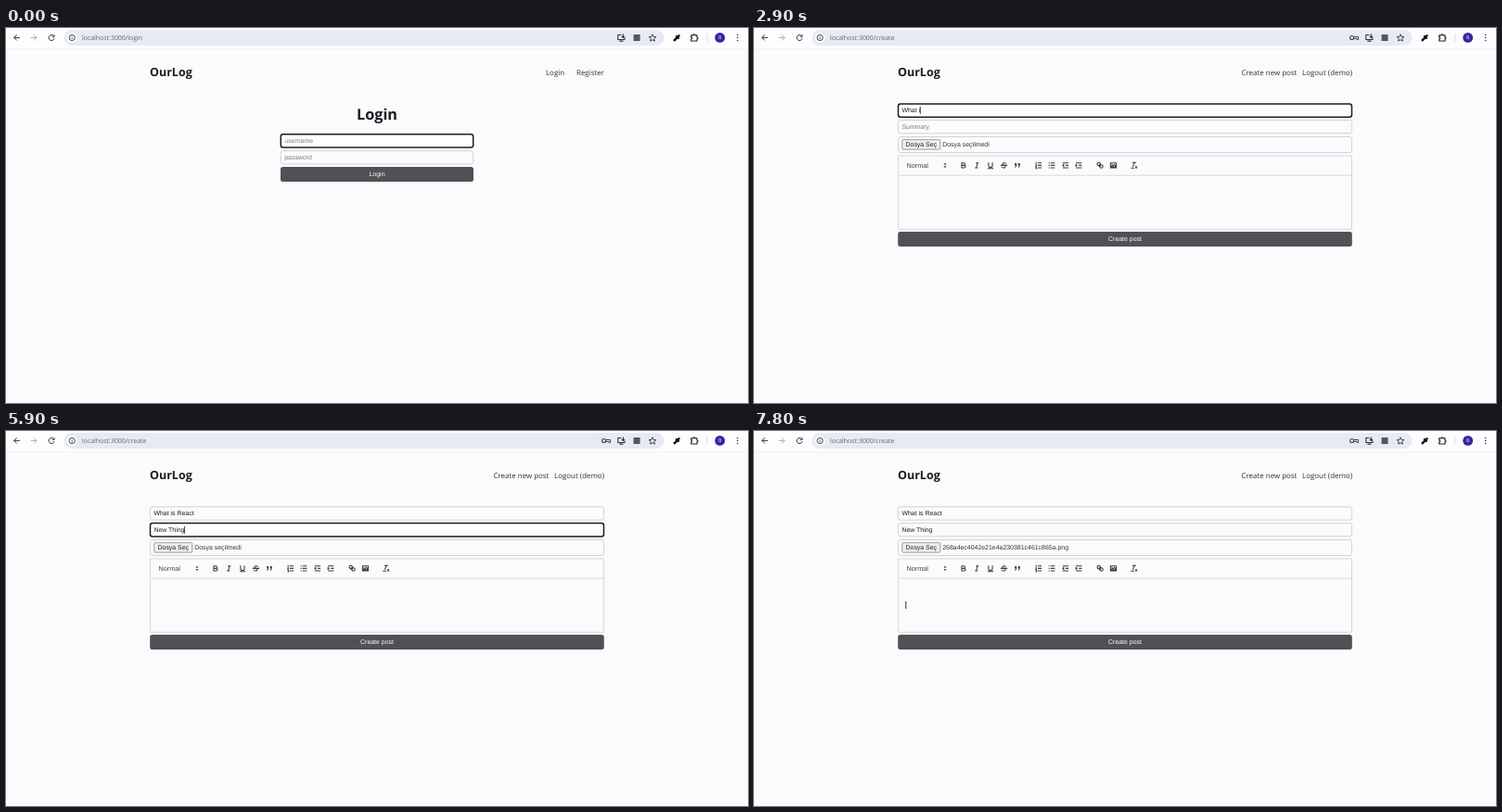
Animation of 800 by 405 pixels, one loop 8 s. Source, as an HTML page with a canvas:

```html
<!DOCTYPE html>
<html lang="en">
<head>
<meta charset="utf-8">
<title>Blog demo</title>
<style>
html, body { margin: 0; width: 100%; height: 100%; overflow: hidden; background: #fbfafd; }
canvas { display: block; }
</style>
</head>
<body>
<canvas id="stage" width="800" height="405"></canvas>
<script>
const ctx = document.getElementById('stage').getContext('2d');
const LOOP = 8000;
const UI = '"Open Sans", "Noto Sans", sans-serif';
const FORM = '"Liberation Sans", Arial, sans-serif';
const INK = '#1d1b20', BORDER = '#cfced2', PAGE = '#fbfafd';
const SITE = 'OurLog', USER = 'demo';
const FILE = '268a4ec4042e21e4a230381c461c865a';

// Drawing helpers; text is placed by the middle of its capitals.
function text(s, x, y, size, color = INK, { font = UI, weight = 400, align = 'left' } = {}) {
  ctx.font = `${weight} ${size}px ${font}`;
  ctx.textRendering = 'geometricPrecision';
  ctx.textAlign = align;
  ctx.fillStyle = color;
  ctx.fillText(s, x, y + size * 0.355);
  return ctx.measureText(s).width;
}
const formText = (s, x, y, color = INK, align = 'left', size = 6.94) =>
  text(s, x, y, size, color, { font: FORM, align });

function rect(x, y, w, h, fill, stroke, radius = 0, width = 1) {
  ctx.beginPath();
  ctx.roundRect(x, y, w, h, radius);
  if (fill) { ctx.fillStyle = fill; ctx.fill(); }
  if (stroke) { ctx.strokeStyle = stroke; ctx.lineWidth = width; ctx.stroke(); }
}
function disc(x, y, r, fill, stroke, width = 1) {
  ctx.beginPath();
  ctx.arc(x, y, r, 0, Math.PI * 2);
  if (fill) { ctx.fillStyle = fill; ctx.fill(); }
  if (stroke) { ctx.strokeStyle = stroke; ctx.lineWidth = width; ctx.stroke(); }
}
// Strokes (or fills) an SVG path given relative to x, y.
function path(d, x, y, color = INK, { scale = 1, width = 1, fill = false } = {}) {
  ctx.save();
  ctx.translate(x, y);
  ctx.scale(scale, scale);
  ctx.lineWidth = width;
  ctx.strokeStyle = ctx.fillStyle = color;
  ctx.lineJoin = 'round';
  const shape = new Path2D(d);
  fill ? ctx.fill(shape) : ctx.stroke(shape);
  ctx.restore();
}
const chevronDown = (x, y, color = '#555') => path('M-2-1L0 1L2-1', x, y, color, { width: 0.8 });
const chevronRight = (x, y) => path('M-1-2L1 0L-1 2', x, y, '#555', { width: 0.8 });
const triangleDown = (x, y) => path('M-2-1H2L0 1.2Z', x, y, '#444', { fill: true });

// Each burst is [start, count]: one character per 100 ms.
function typing(t, value, focusAt, bursts) {
  let shown = 0, last = focusAt;
  for (const [start, count] of bursts) {
    if (t < start) break;
    const n = Math.min(count, Math.floor((t - start) / 100) + 1);
    shown += n;
    last = start + (n - 1) * 100;
  }
  return { value: value.slice(0, shown), caret: (t - last) % 1000 < 500 };
}

function input(x, y, w, placeholder, field, focused) {
  const h = 14.6;
  if (focused) rect(x + 0.3, y + 0.2, w - 0.6, h - 0.3, '#fff', INK, 2.5, 1.5);
  else rect(x + 0.2, y + 0.2, w - 0.4, h - 0.4, PAGE, BORDER, 2.5, 0.9);
  const mid = y + h / 2;
  const width = field.value
    ? formText(field.value, x + 4.2, mid)
    : (formText(placeholder, x + 4.2, mid, '#7b797e'), 0);
  if (focused && field.caret) rect(x + 4 + width, mid - 4, 0.8, 8, INK);
}
function button(x, y, w, label) {
  rect(x, y, w, 15.8, '#525054', null, 2.5);
  formText(label, x + w / 2, y + 7.7, '#fff', 'center');
}

function browserBar(url, hasKey) {
  rect(0, 0, 800, 22.5, '#fdfcff');
  rect(0, 22, 800, 0.8, '#f0eff3');
  path('M3.2 0H-3M0-3L-3 0L0 3', 11.7, 10.4, '#333');
  path('M-3.2 0H3M0-3L3 0L0 3', 30, 10.4, '#aaa');
  path('M2.4-1.8A3 3 0 1 0 3 .8M3-3.2V-1H.7', 49, 10.4, '#333');
  rect(62.5, 2, 647, 17, '#e6eaf3', null, 8.5);
  disc(71.2, 10.5, 5.8, '#fafbfe');
  disc(71.2, 10.5, 3.1, null, '#333', 0.9);
  path('M0-1.7V-.9M0-.2V1.7', 71.2, 10.5, '#333', { width: 0.8 });
  text(url, 82, 10.6, 6.95, '#62646a');

  if (hasKey) {
    disc(644.6, 10.5, 2, null, '#444', 1.1);
    path('M2.2-1H7V2H5.5V1H2.2', 644.6, 10.5, '#444', { width: 1 });
  }
  path('M0-3H-3.6V2H3.6V0M-2 3.6H2M2-4V0M.4-1.6L2 0L3.6-1.6', 663.4, 10.5, '#333', { width: 1.1 });
  rect(676.6, 7, 7, 7, '#55565c');
  path('M0-3.9L1.1-1.3L3.9-1.1L1.8.7L2.4 3.4L0 2L-2.4 3.4L-1.8.7L-3.9-1.1L-1.1-1.3Z', 697, 10.7, '#333', { width: 0.9 });
  path('M-3.3 3.3L1 -1', 723.3, 10.6, '#111', { width: 2.4 });
  path('M-1-2.4L2.4 1M.6-.6L3-3', 723.3, 10.6, '#111', { width: 2.1 });
  path('M-3.3-2.6H-.9A1 1 0 0 1 1.1-2.6H3V-.6A1 1 0 0 1 3 1.4V3.5H-3.3V1.6A1 1 0 0 0-3.3-.6Z', 742, 10.5, '#222', { width: 1.1 });
  rect(755.5, 6, 0.8, 9, '#d5d3ec');
  disc(769.7, 10.4, 5.4, '#3d229c');
  text('B', 769.7, 10.4, 5.4, '#eee', { align: 'center' });
  for (const dy of [-3, 0, 3]) disc(788.7, 10.5 + dy, 0.8, '#333');
}

function siteHeader(loggedIn) {
  text(SITE, 155, 47.7, 12.5, INK, { weight: 700 });
  const [first, second, x] = loggedIn
    ? ['Create new post', `Logout (${USER})`, 525.5]
    : ['Login', 'Register', 582];
  text(first, x, 47.7, 7.95, '#333');
  text(second, 645, 47.7, 7.95, '#333', { align: 'right' });
}

function loginPage(t) {
  const onPassword = t >= 1000;
  text('Login', 400, 93.2, 16.3, INK, { weight: 700, align: 'center' });
  input(296, 114.6, 208, 'username', typing(t, USER, -600, [[300, 4]]), !onPassword);
  input(296, 132.5, 208, 'password', typing(t, '••••', 1000, [[1300, 4]]), onPassword);
  button(296, 150.1, 208, 'Login');
}

// Editor icons live on an 18-unit grid.
const EDITOR_ICONS = [
  [226, 'M5 4H9.5A2.5 2.5 0 0 1 9.5 9H5ZM5 9H10.5A2.5 2.5 0 0 1 10.5 14H5Z'],
  [240.3, 'M7 4H13M5 14H11M8 14L10 4'],
  [255, 'M5 3V9A4 4 0 0 0 13 9V3M3 15.5H15'],
  [269.5, 'M2 9H16M13 5.5C11 3 5.5 3.5 6 6.5C6.5 9 12 8.5 12 11.5C12 15 6 15 4.5 12'],
  [284, 'M4.5 5.5H6.5V8H4.5ZM6.5 8Q6.5 12 4 13M11.5 5.5H13.5V8H11.5ZM13.5 8Q13.5 12 11 13'],
  [307, 'M7 4H15M7 9H15M7 14H15M3.5 2V6M2.5 8H4.5L2.5 11H4.5M2.5 13H4.5V16H2.5'],
  [321.3, 'M6 4H15M6 9H15M6 14H15M2 4H4M2 9H4M2 14H4'],
  [336, 'M3 14H15M3 4H15M9 9H15M5 7V11L3 9Z'],
  [350.3, 'M3 14H15M3 4H15M9 9H15M3 7V11L5 9Z'],
  [373, 'M7 7L11 11M8.9 9A3.4 3.4 0 1 0 4.4 8.9Q6.5 11 8.9 9M9.1 9A3.4 3.4 0 1 1 9.3 13.4Q7.5 11 9.1 9'],
  [387.5, 'M3 4H15V14H3ZM6 6V8M5 12V11L7 9L8 10L11 7L13 9V12Z'],
  [410, 'M5 3H13M6 12L9.35 3M11 11L15 15M15 11L11 15M2 14.5H9']
];

function createPage(t) {
  const titleFocus = t >= 2300 && t < 4400, summaryFocus = t >= 4400 && t < 6200;
  input(155.2, 81.7, 489.6, 'Title', typing(t, 'What is React', 2300, [[2400, 7], [3200, 6]]), titleFocus);
  input(155.2, 99.4, 489.6, 'Summary', typing(t, 'New Thing', 4400, [[4800, 4], [5300, 5]]), summaryFocus);

  rect(155.5, 117.5, 489, 17, null, BORDER, 2.5, 0.9);
  rect(159.8, 120.7, 41, 10.4, '#efeff0', '#858487', 1, 0.8);
  formText('Dosya Seç', 180.3, 125.9, INK, 'center');
  formText(t < 7400 ? 'Dosya seçilmedi' : FILE + '.png', 203.2, 125.9, '#333');

  rect(155.5, 138, 489, 79.3, null, BORDER, 0, 0.8);
  rect(155.5, 158.8, 489, 0.7, BORDER);
  formText('Normal', 164.4, 148.2, '#444', 'left', 7.3);
  path('M-1.7-.8L0-2.7L1.7-.8ZM-1.7.8L0 2.7L1.7.8Z', 206, 148.4, '#333', { fill: true });
  for (const [x, d] of EDITOR_ICONS) path(d, x - 4.7, 143.7, '#3b3a3e', { scale: 0.52, width: 2 });

  if (t >= 7600) {
    const line = Math.min(2, Math.floor((t - 7600) / 100));
    rect(163.3, 165.9 + line * 9, 0.9, 8.2, INK);
  }
  button(155.2, 220.1, 489.6, 'Create post');
}

const SIDEBAR = [
  ['3D Nesneler', '#36a3c9'], ['Belgeler', '#8aa0b5'], ['Downloads', '#2f7fd0'],
  ['Masaüstü', '#1c8fdb'], ['Müzikler', '#2b8ad6'], ['Resimler', '#6aa8cf'],
  ['Videolar', '#5a5f70'], ['Yerel Disk (C:)', '#8b949c'], ['Yeni Birim (D:)', '#8b949c']
];

function sidebar() {
  rect(17.5, 44.2, 7, 5, '#3a9bdc', '#55707f', 0, 0.6);
  rect(19, 50, 4, 0.9, '#55707f');
  text('Bu bilgisayar', 26.8, 47.6, 5.9);
  rect(3.5, 91.2, 73, 12.4, '#d9d9d9');
  SIDEBAR.forEach(([label, color], i) => {
    const y = 60 + i * 12.46;
    if (label === 'Downloads') path('M0-3.5V2.5M-2.8 0L0 2.8L2.8 0', 24.8, y, color, { width: 1.6 });
    else if (label === 'Müzikler') {
      path('M0 2V-3.5L2.5-1.5', 24.5, y, color, { width: 1.2 });
      disc(23.3, y + 2.2, 1.6, color);
    } else {
      const flat = label.includes(':');
      rect(21, y - (flat ? 1.2 : 3), 7.5, flat ? 3.6 : 6, color, null, 0.6);
    }
    text(label, 30.5, y, 5.9);
  });
  disc(18.8, 176.6, 2.1, '#3a9bdc');
  rect(19.8, 174.5, 4.5, 4, '#4aa6df');
  text('Ağ', 26.8, 176.5, 5.9);

  rect(76.3, 38, 8.6, 149.5, '#f0f0f0');
  rect(76.6, 105, 8, 74, '#8e8e90');
  path('M-2 1L0-1L2 1', 80.6, 41.3, '#555');
  path('M-2-1L0 1L2-1', 80.6, 183.2, '#555');
}

function fileTile(x, lines, dark) {
  rect(x - 22, 44, 46, 45, '#c9c9cb');
  rect(x - 23, 43, 46, 45, '#fff', '#e4e4e6', 0, 0.5);
  if (dark) {
    disc(x, 65.5, 18, '#858587');
    disc(x, 59.8, 5.2, '#fff');
    path('M-9.5 11V8Q-9.5 2 -3 2H3Q9.5 2 9.5 8V11Z', x, 65.5, '#fff', { fill: true });
  } else {
    disc(x, 65.5, 22.6, '#e2e2e4');
    disc(x, 60, 5.8, null, '#2e2e30', 2);
    path('M-9.2 11A9.2 9.2 0 0 1 9.2 11', x, 65.5, '#2e2e30', { width: 2 });
  }
  lines.forEach((s, i) => text(s, x, 96 + i * 8.3, 5.8, INK, { align: 'center' }));
}

function fileDialog(hover) {
  ctx.save();
  ctx.shadowColor = 'rgba(0,0,0,.35)';
  ctx.shadowBlur = 6;
  ctx.shadowOffsetY = 1;
  rect(3.5, -10, 392.8, 239.8, '#f0f0f0');
  ctx.restore();
  rect(3.5, 0, 392.8, 187.7, '#fff');

  path('M3 0H-3M0-2.6L-2.8 0L0 2.6', 13.6, 9.8, '#444', { width: 0.9 });
  path('M-3 0H3M0-2.6L2.8 0L0 2.6', 30, 9.8, '#aaa', { width: 0.9 });
  chevronDown(42, 9.8, '#999');
  path('M0 3.2V-3M-2.6-.4L0-3L2.6-.4', 53, 9.8, '#444', { width: 0.9 });
  rect(60.5, -2, 203.5, 20, null, '#d9d9db', 0, 0.8);
  rect(62.5, 6, 5.2, 7.5, '#e2dfc4');
  for (const [label, x] of [['Bu bilgisayar', 79.7], ['Masaüstü', 126], ['uploads', 163.3]]) {
    chevronRight(x - 5.6, 9.7);
    text(label, x, 9.7, 5.9);
  }
  chevronDown(254.5, 9.8);
  path('M2.2-1.6A2.7 2.7 0 1 0 2.7.6M2.8-2.8V-.9H.8', 272, 9.8, '#444', { width: 0.9 });
  rect(286.2, -2, 104.8, 20, null, '#d9d9db', 0, 0.8);
  disc(297, 8.8, 2.2, null, '#777', 0.8);
  path('M0 0L-2 2', 295.4, 10.5, '#777', { width: 0.8 });
  text('Ara: uploads', 307, 9.7, 5.9, '#77777b');

  rect(3.5, 19.3, 392.8, 18.4, '#f5f6f7');
  text('Düzenle', 13, 28.4, 5.9, '#2a3950');
  triangleDown(39, 28.6);
  text('Yeni klasör', 56, 28.4, 5.9, '#2a3950');
  rect(333, 25.6, 7, 5.6, '#8cb4d8', '#607890', 0, 0.6);
  rect(334, 28.6, 5, 2, '#3d6f9c');
  triangleDown(347.5, 28.6);
  rect(361.6, 25.6, 7, 6, '#fff', '#6a7480', 0, 0.7);
  rect(365.4, 26, 3, 5.3, '#3d8ed0');
  disc(384, 28.5, 4.2, '#1e5fb8');
  text('?', 384, 28.5, 6, '#fff', { weight: 700, align: 'center' });

  sidebar();
  rect(94.6, 40.3, 54.8, 77.4, '#c8e4fa', '#a4d0f0', 0, 0.7);
  fileTile(121.2, ['268a4ec4042e21', 'e4a230381c461c', '865a']);
  fileTile(181, ['a228ea3d58cc17', '8eba51bd908890', 'f327']);
  fileTile(240.6, ['dd269dc5419512', '2d76741677a836', 'b8dd'], true);

  rect(3.5, 187.7, 392.8, 42, '#f0f0f0');
  rect(3.5, 187.4, 392.8, 0.7, '#dcdcde');
  text('Dosya adı:', 95, 200.8, 5.9, INK, { align: 'right' });
  rect(97, 194.8, 186.6, 12, '#fff', '#a5a5a8', 0, 0.8);
  text(FILE, 98.4, 200.8, 5.9);
  chevronDown(279, 200.8);
  rect(290, 194.8, 97.2, 12, hover ? '#dfe5eb' : '#e1e2e4', '#adadb0', 0, 0.8);
  text('Tüm Dosyalar', 291.8, 200.8, 5.9);
  chevronDown(383, 200.8);
  rect(290.8, 210.4, 44.2, 12.4, hover ? '#e5f1fb' : '#dfe1e4', '#0f78d0', 0, hover ? 0.8 : 1.2);
  text('Aç', 312.8, 216.5, 5.9, INK, { align: 'center' });
  rect(342.4, 210.4, 44.8, 12.4, '#e1e1e2', '#adadb0', 0, 0.8);
  text('İptal', 364.8, 216.5, 5.9, INK, { align: 'center' });
  for (const [x, y] of [[394.5, 224.5], [394.5, 227.5], [391.5, 227.5]]) rect(x, y, 1, 1, '#b5b5b8');
}

function draw(t) {
  const loggedIn = t >= 1800, creating = t >= 2200;
  rect(0, 0, 800, 405, PAGE);
  browserBar('localhost:3000' + (creating ? '/create' : loggedIn ? '' : '/login'), t >= 1300);
  siteHeader(loggedIn);
  if (creating) createPage(t);
  else if (!loggedIn) loginPage(t);
  if (t >= 6200 && t < 7400) fileDialog(t >= 6900);
}

const start = performance.now();
function frame() {
  draw((performance.now() - start) % LOOP);
  requestAnimationFrame(frame);
}
frame();
</script>
</body>
</html>
```
